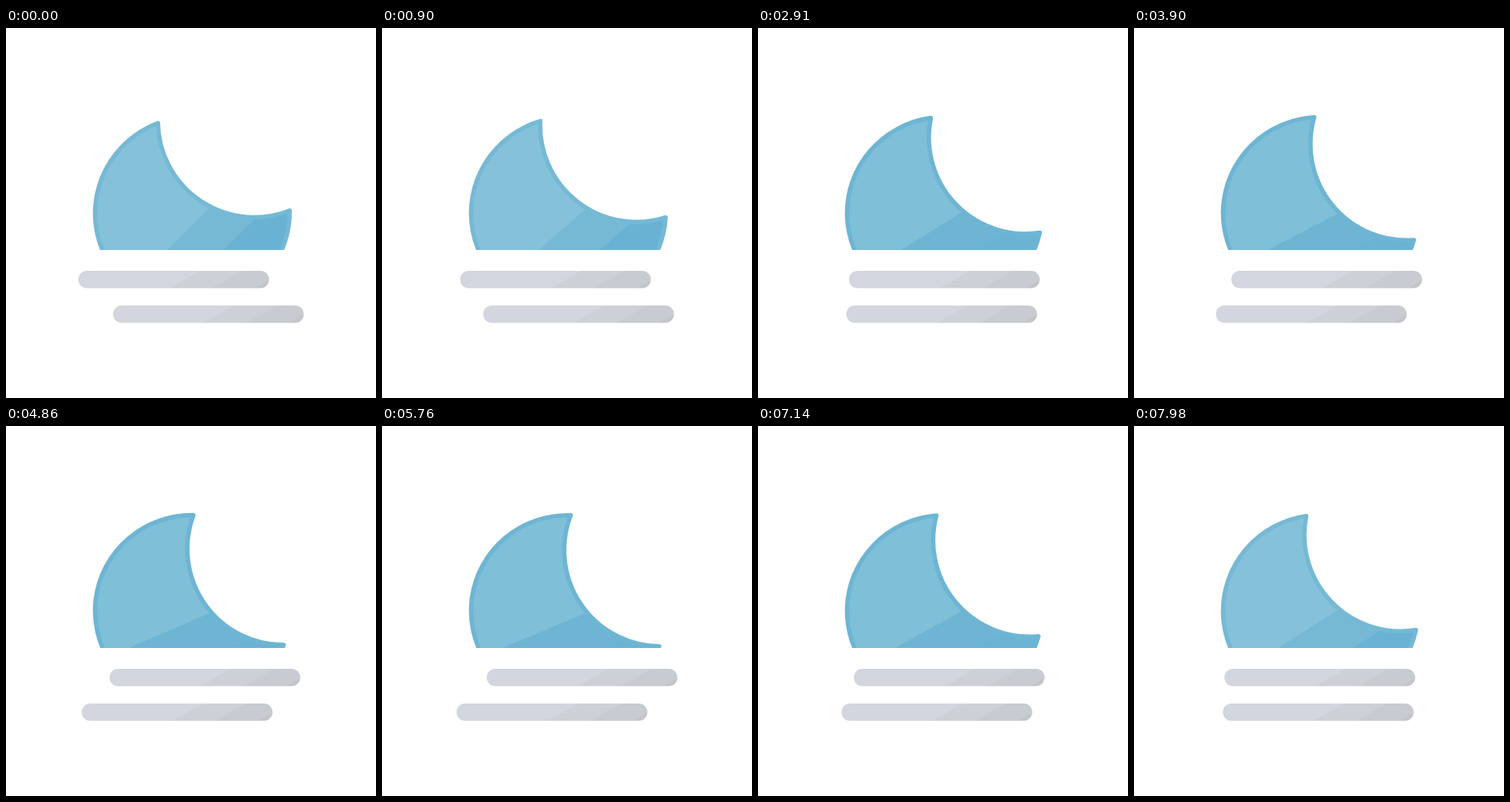
Recreate the animation shown at these times as an HTML page. Size 480 by 480 pixels, loop 8 s.

```html
<!DOCTYPE html>
<html lang="en">
<head>
<meta charset="utf-8">
<title>Foggy night</title>
<style>
  html, body { margin: 0; height: 100%; overflow: hidden; background: #fff; }
  svg { display: block; width: 100%; height: 100%; }
</style>
</head>
<body>
<svg viewBox="0 0 512 512">
  <defs>
    <clipPath id="horizon"><path d="M0 0H512V307.2H0z"/></clipPath>
    <linearGradient id="moonFill" gradientUnits="userSpaceOnUse" x1="196" y1="152" x2="316" y2="360"/>
    <linearGradient id="fogFill" gradientUnits="userSpaceOnUse" x1="196" y1="-104" x2="316" y2="104"/>
  </defs>
  <g clip-path="url(#horizon)">
    <path id="moon" d="M244 123.9A134.8 132.8 0 1 0 388.8 288A133.3 133.3 0 0 1 244 123.9z"
      fill="url(#moonFill)" stroke-width="6" stroke-linejoin="round"/>
  </g>
  <g fill="url(#fogFill)">
    <rect id="upperFog" x="124" y="-12" width="264" height="24" rx="12"/>
    <rect id="lowerFog" x="124" y="-12" width="264" height="24" rx="12"/>
  </g>
</svg>
<script>
  const LOOP = 8000, STEP = 30, HALF_SWING = 5400;
  const DAWN_SHADES = ['#86c1da', '#75b9d5', '#69b2d3'];
  const DUSK_SHADES = ['#7fbfd7', '#6eb5d4', '#6bb3d3'];
  const byId = id => document.getElementById(id);
  const moon = byId('moon');

  // Fills a gradient with flat bands that meet at the given offsets.
  function setBands(id, colors, edges) {
    const limits = [0, ...edges, 1];
    byId(id).innerHTML = colors.map((color, i) =>
      `<stop offset="${limits[i]}" stop-color="${color}"/>` +
      `<stop offset="${limits[i + 1]}" stop-color="${color}"/>`).join('');
  }

  let shades;
  function shadeMoon(next) {
    if (next === shades) return;
    shades = next;
    setBands('moonFill', shades, [0.553, 0.784]);
    moon.setAttribute('stroke', shades[1]);
  }

  function draw(time) {
    const t = Math.floor(time % LOOP / STEP) * STEP;
    const swing = 1 - Math.abs(t / HALF_SWING - 1);
    const drift = 48 * swing - 24;
    moon.setAttribute('transform', `rotate(${24 * swing - 15} 256 256)`);
    shadeMoon(swing < 0.53 ? DAWN_SHADES : DUSK_SHADES);
    byId('upperFog').setAttribute('transform', `translate(${drift} 348)`);
    byId('lowerFog').setAttribute('transform', `translate(${-drift} 396)`);
  }

  setBands('fogFill', ['#d3d6de', '#cdd0d7', '#c8cbd1', '#c3c5ca'], [0.531, 0.654, 0.777]);
  const start = performance.now();
  function tick() {
    draw(performance.now() - start);
    requestAnimationFrame(tick);
  }
  tick();
</script>
</body>
</html>
```
